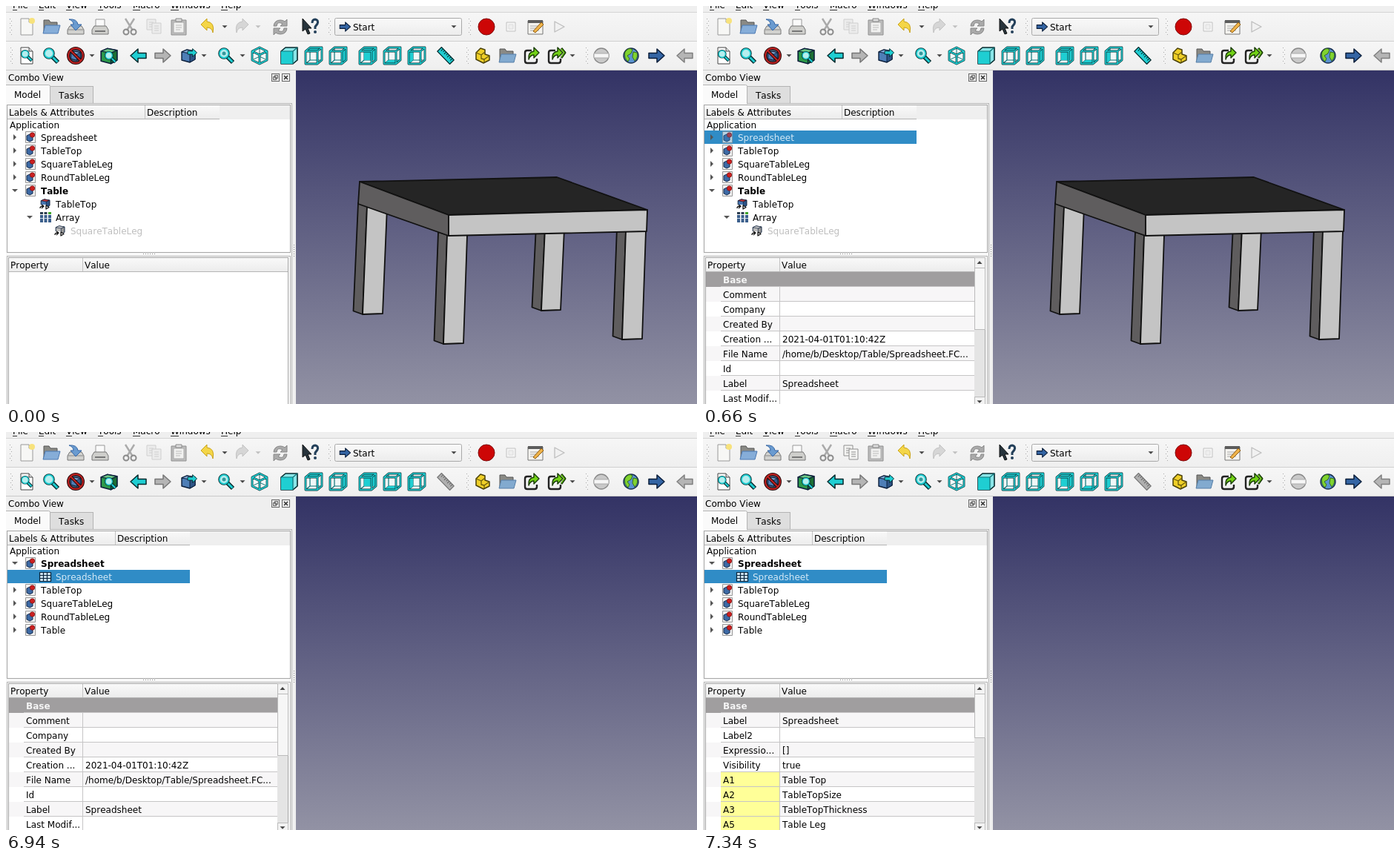
Animation of 932x537 px, one loop 8 s. Source, as an HTML page:

```html
<!DOCTYPE html>
<html lang="en">
<head>
<meta charset="utf-8">
<title>Table model</title>
<style>
html, body { margin: 0; width: 100%; height: 100%; overflow: hidden; background: #efefef; }
svg { display: block; width: 932px; height: 537px; font: 12px "DejaVu Sans", sans-serif; font-kerning: none; }
text { white-space: pre; }
</style>
</head>
<body>
<svg id="stage" viewBox="0 0 932 537"></svg>
<script>
const LOOP = 8000;
const STEPS = [500, 660, 4260, 4680, 6940, 7060, 7340];
const SELECT = 1, PROPS = 2, EXPAND = 3, NO_RULER = 4, CHILD = 5, CHILD_PROPS = 6, CAN_COPY = 7;
const CYAN = '#1fced2', DARK = '#06292c', BLUE = '#3465a4', NAVY = '#0b1e3a', SEL = '#308cc6';

const rect = (x, y, w, h, fill, stroke) =>
  `<rect x="${x}" y="${y}" width="${w}" height="${h}" fill="${fill}"${stroke ? ` stroke="${stroke}"` : ''}/>`;
const path = (d, fill = 'none', stroke = 'none', w = 1) =>
  `<path d="${d}" fill="${fill}" stroke="${stroke}" stroke-width="${w}" stroke-linejoin="round"/>`;
const circle = (x, y, r, fill, stroke = 'none', w = 1) =>
  `<circle cx="${x}" cy="${y}" r="${r}" fill="${fill}" stroke="${stroke}" stroke-width="${w}"/>`;
const text = (x, y, s, fill = '#000', bold) =>
  `<text x="${x}" y="${y}" fill="${fill}"${bold ? ' font-weight="bold"' : ''}>${s.replace('&', '&amp;')}</text>`;
const at = (x, y, body, scale = 1) => `<g transform="translate(${x} ${y}) scale(${scale})">${body}</g>`;
const frame = (x, y, w, h, fill, stroke) => rect(x + .5, y + .5, w - 1, h - 1, fill, stroke);
const down = (x, y, fill = '#444', r = 3.5) => path(`M${x - r} ${y - r / 2}h${2 * r}l${-r} ${r}z`, fill);
const right = (x, y) => path(`M${x - 2} ${y - 4}l4 4l-4 4z`, '#555');

const arrow = (fill, stroke, dir = 1) =>
  path(`M${11 * dir} 0L${1 * dir} -9V-3.5H${-10 * dir}V3.5H${1 * dir}V9Z`, fill, stroke, 1.5);
const lens = () => path('M1 1L9 9', 'none', DARK, 6) + path('M1 1L8.5 8.5', 'none', CYAN, 3) +
  circle(-3, -3, 6, '#8ee6e8', DARK, 3.6) + circle(-3, -3, 6, '#b6eeee', CYAN, 1.8);
const box = (fill, side, top) => path('M-9 -5L-2 -8L9 -6V5L2 9L-9 6Z', fill, NAVY, 1.4) +
  path('M2 -3L9 -6V5L2 9Z', side, NAVY, 1) + path('M-9 -5L-2 -8L9 -6L2 -3Z', top, NAVY, 1);
const folder = (c, light) => path('M-10 8V-9H-3L-1 -6H8V8Z', '#8a8a85', '#555', 1) +
  path('M-11 9L-8 -2H12L9 9Z', c, light, 1);

// Cube with one highlighted face; only the front view is solid
const FACES = {
  top: 'M-11 -6L-5 -11H11L5 -6Z', right: 'M5 -6L11 -11V6L5 11Z',
  rear: 'M-5 -11H11V6H-5Z', bottom: 'M-11 11L-5 6H11L5 11Z', left: 'M-11 -6L-5 -11V6L-11 11Z'
};
function cube(face) {
  const hull = 'M-11 -6L-5 -11H11V6L5 11H-11Z', edges = 'M-11 -6H5V11M5 -6L11 -11';
  if (face === 'front')
    return path(hull, '#8be6e8', DARK, 1.6) + path('M-11 -6H5V11H-11Z', CYAN) + path(edges, 'none', '#0d7478', 1.2);
  const wires = hull + edges, hidden = 'M-5 -11V6H11M-5 6L-11 11';
  return path(hull, '#f0f8f8') + path(hidden, 'none', '#0d7478', 1.2) + path(FACES[face], CYAN) +
    path(wires, 'none', DARK, 2.8) + path(wires, 'none', CYAN, 1.5);
}
function isoCube() {
  const d = 'M0 -11L10 -6V6L0 11L-10 6V-6ZM-10 -6L0 -1L10 -6M0 -1V11';
  return path(d, '#f0f8f8') + path('M-10 6L0 1L10 6M0 1V-11', 'none', '#0d7478') +
    path(d, 'none', DARK, 2.8) + path(d, 'none', CYAN, 1.5);
}
function ruler(on) {
  return '<g transform="rotate(46)">' + path('M-12 -4H12V4H-12Z', on ? CYAN : '#b0b0b0', on ? DARK : '#777', 1.3) +
    path('M-9 -4v4m3 -4v3m3 -3v4m3 -4v3m3 -3v4m3 -4v3m3 -3v4', 'none', on ? DARK : '#666') + '</g>';
}
function link(extra) {
  return path('M0 -7H-6Q-9 -7 -9 -4V7Q-9 10 -6 10H4Q7 10 7 7V4', 'none', '#222', 2.4) +
    path('M-4 5Q-5 -5 3 -6V-11L10 -4L3 3V-1Q-2 -1 -4 5Z', '#73d216', '#173a05', 1.4) +
    (extra ? path('M8 -10L13 -4L8 3', 'none', '#173a05', 3) + path('M8 -9L12 -4L8 2', 'none', '#73d216', 1.3) : '');
}
function page(c, line) {
  return path('M-8 -11H3L8 -6V11H-8Z', c, line) + path('M3 -11V-6H8', '#ddd', line);
}
function grip(x, y) {
  let dots = '';
  for (let i = 0; i < 8; i++) dots += rect(x + (i % 2) * 2, y + i * 3, 1, 1, '#a8a8a8');
  return dots;
}
const globe = () => circle(0, 0, 10, '#5b93d0', '#172d4d', 1.4) +
  path('M-8 -5Q-3 -12 2 -8L0 -3L-5 0L-2 4L-4 8Q-10 3 -8 -5ZM3 -5L8 -4Q10 2 5 7L2 2Z', '#80d330', '#2a5c0c', .8);

function fileBar(stage) {
  const copyLine = stage >= CAN_COPY ? '#909090' : '#cfcfcf';
  const copyFill = stage >= CAN_COPY ? '#f4f4f2' : '#ececec';
  const sheet = (x, y) => path(`M${x} ${y}h12v14h-12zm3 4h6m-6 3h6m-6 3h6`, copyFill, copyLine);
  const turn = dir => path(`M${-9 * dir} -3L${-1 * dir} -11V-7Q${10 * dir} -6 ${7 * dir} 8Q${6 * dir} 1 ${-1 * dir} 1V5Z`,
    dir > 0 ? '#f4d648' : '#d6d6d6', dir > 0 ? '#c9a21a' : '#c2c2c2');
  const icons = [
    [28, page('#f7f7f5', '#999') + circle(7, -8, 4, '#f7e27c')],
    [61, folder('#86add8', '#4a78b2')],
    [94, path('M-8 -1H8L11 4V10H-11V4Z', '#d2d2cf', '#777') + path('M-10 4H10', 'none', '#888') +
      path('M-9 -10Q2 -11 3 -3H8L0 5L-7 -3H-3Q-3 -8 -9 -10Z', '#6a9bd0', BLUE)],
    [127, path('M-6 -10H6V1H-6Z', '#fafafa', '#999') + path('M-8 -1H8L11 4V10H-11V4Z', '#cfcfcc', '#777') +
      path('M-7 6H7', 'none', '#777', 2)],
    [167, path('M-6 -11L4 5M6 -11L-4 5', 'none', '#aaa', 2.4) + circle(-5, 7, 3.5, 'none', '#8b8b8b', 2) +
      circle(5, 7, 3.5, 'none', '#8b8b8b', 2)],
    [200, sheet(-10, -10) + sheet(-3, -5)],
    [233, path('M-10 -9H10V11H-10Z', '#bcbcbc', '#909090') + path('M-7 -6H7V8H-7Z', '#f1f1f0', '#aaa') +
      path('M-4 -11H4V-7H-4Z', '#ddd', '#888') + path('M-4 -2H4M-4 1H4M-4 4H2', 'none', '#bbb')],
    [272, turn(1)], [318, turn(-1)],
    [370, path('M-9 -1Q-8 -9 0 -9Q4 -9 6 -7L9 -10V-1H0L3 -4Q-4 -8 -5 -1ZM9 2Q8 10 0 10Q-4 10 -6 8L-9 11V2H0L-3 5Q4 9 5 2Z',
      '#aaa', '#878787')],
    [410, path('M-10 -11V6L-6 3L-3 10L0 9L-3 2H2Z', '#27343c', '#111') +
      path('M3 -5Q3 -10 7 -10Q12 -9 10 -4L7 0V3', 'none', '#24405a', 3) + circle(7, 7, 2, '#24405a')],
    [648, circle(0, 0, 11, '#cd0606', '#7e0a0a', 1)],
    [681, path('M-6 -6H6V6H-6Z', '#f5f5f5', '#c2c2c2') + path('M-3 -3H3V3H-3Z', '#eee', '#ddd')],
    [714, path('M-10 -8H10V10H-10Z', '#f4f3ef', '#777') + rect(-10, -9, 20, 4, '#5c5c5c') +
      path('M-7 -1H5M-7 2H3M-7 5H5', 'none', '#aaa') + path('M-3 6L8 -6L11 -3L0 8Z', '#efb34a', '#8e5b10')],
    [746, path('M-6 -7L7 0L-6 7Z', '#f1f1f1', '#bebebe', 1.3)]
  ];
  return icons.map(([x, body]) => at(x, 28, body)).join('') +
    down(295, 28) + down(340, 28, '#c0c0c0') + grip(5, 17) + grip(435, 17) + grip(624, 17) +
    '<rect x="443.5" y="16.5" width="171" height="23" rx="2" fill="url(#button)" stroke="#a9a9a9"/>' +
    at(457, 28, arrow(BLUE, NAVY), .68) + text(468, 33, 'Start') + down(604, 28);
}

function viewBar(stage) {
  const icons = [
    [28, page('#fff', '#444') + at(0, 0, lens(), .75)],
    [61, lens()],
    [94, circle(0, 0, 10, '#3f5570') + at(0, 0, box('#4f7eb6', '#355f96', '#85addb'), .7) +
      path('M-7 -7L7 7', 'none', '#2b0c0c', 4) + circle(0, 0, 10, 'none', '#2b0c0c', 4) +
      path('M-7 -7L7 7', 'none', '#c32222', 1.8) + circle(0, 0, 10, 'none', '#c32222', 1.8)],
    [139, at(0, 0, box('#2c9a4a', '#1d6f35', '#6cc884'), 1.2) + at(2, 2, lens(), .75)],
    [179, arrow(CYAN, DARK, -1)], [211, arrow('#b5b5b5', '#777')],
    [246, box('#4e7eb7', '#2e5486', '#83acda') + at(5, -4, arrow(CYAN, DARK), .6)],
    [297, lens() + circle(-3, -3, 2.5, '#35989b')],
    [342, isoCube()], [382, cube('front')], [415, cube('top')], [448, cube('right')],
    [488, cube('rear')], [521, cube('bottom')], [554, cube('left')],
    [593, ruler(stage < NO_RULER)],
    [643, path('M-9 -4L-3 -10L3 -8V-2L9 0V6L1 10L-9 5Z', '#efcf28', '#49400a', 1.5) +
      path('M-9 -4L-2 -1L3 -5M-2 -1V4L2 5L9 0M2 5V9', 'none', '#6a5c0d', 1.3)],
    [676, folder('#82aacf', '#567fa8')], [709, link()], [741, link(true)],
    [803, circle(0, 0, 10, '#c9c9c9', '#888', 1.3) + path('M-10 -3H10V3H-10Z', '#f6f6f6', '#aaa')],
    [843, globe()], [877, arrow(BLUE, NAVY)], [916, arrow('#b5b5b5', '#808080', -1)]
  ];
  return icons.map(([x, body]) => at(x, 67, body)).join('') +
    [116, 267, 319, 764].map(x => down(x, 67)).join('') + [6, 621, 782].map(x => grip(x, 56)).join('');
}

function menu() {
  const items = [[9, 'File', 6], [44, 'Edit', 7], [81, 'View', 8], [124, 'Tools', 7], [171, 'Macro', 10], [222, 'Windows', 11], [290, 'Help', 9]];
  return items.map(([x, s, w]) => text(x, 3, s) + rect(x, 5, w, 1, '#333')).join('');
}

const docIcon = () => path('M-6.5 -7.5H6.5V7.5H-6.5Z', '#f2f2f2', '#979797') +
  path('M-5 -2L-1 -4L3 -2V4L-1 6L-5 4Z', '#3d6aa5', '#142b4d') + circle(2.5, -3, 3.2, '#cc2020', '#7c0d0d', .7);
const linkIcon = grey => at(0, -1, box(grey ? '#bcbcbc' : '#4777b3', grey ? '#999' : '#2d5487', grey ? '#ccc' : '#c43434'), .65) +
  path('M-8 1H1V7H-8Z', '#fff') + path('M-7 6Q-7 3 -3 3M-5 1L-2 3L-5 6M1 2L5 4.5L1 7Z', '#fff', '#111', 1.3);
const arrayIcon = () => [-7, -1.5, 4].map((x, i) =>
  rect(x, -3, 4, 10, '#3b5f8c') + rect(x, -7, 4, 3, i < 2 ? '#2c3e50' : '#3fa52c') + rect(x, 1, 4, 1, '#cbd8e8')).join('');
const gridIcon = on => path('M-7.5 -5.5h15v12h-15zm0 4h15m-15 4h15m-10 -8v12m5 -12v12', on ? '#cde3f2' : '#fff', on ? '#08243a' : '#111', 1.2);

function tree(stage) {
  const open = stage >= EXPAND;
  const width = open ? 248 : 288, split = open ? 147 : 187;
  // Columns: label, depth, marker, icon, style
  const rows = open
    ? [['Spreadsheet', 0, 'down', docIcon(), 'bold'], ['Spreadsheet', 1, '', gridIcon(stage >= CHILD)],
       ['TableTop', 0, 'right', docIcon()], ['SquareTableLeg', 0, 'right', docIcon()],
       ['RoundTableLeg', 0, 'right', docIcon()], ['Table', 0, 'right', docIcon()]]
    : [['Spreadsheet', 0, 'right', docIcon()], ['TableTop', 0, 'right', docIcon()],
       ['SquareTableLeg', 0, 'right', docIcon()], ['RoundTableLeg', 0, 'right', docIcon()],
       ['Table', 0, 'down', docIcon(), 'bold'], ['TableTop', 1, '', linkIcon()],
       ['Array', 1, 'down', arrayIcon()], ['SquareTableLeg', 2, '', linkIcon(true), 'dim']];
  const picked = stage < SELECT ? -1 : stage < CHILD ? 0 : 1;
  let out = frame(1, 133, 383, 200, '#fff', '#a6a6a6') + rect(2, 134, 381, 19, '#efefef') +
    rect(2, 134, width - 2, 18, 'url(#button)') + rect(2, 152, width - 2, 1, '#b5b5b5') + rect(split, 134, 1, 18, '#c3c3c3') +
    text(4, 148, 'Labels & Attributes') + text(split + 3, 148, 'Description') + text(5, 165, 'Application');
  rows.forEach(([label, depth, mark, icon, style], i) => {
    const y = 177 + i * 18, x = depth * 20, on = i === picked;
    if (on) out += rect(2, y - 9, width - 2, 18, SEL);
    if (mark === 'right') out += right(12 + x, y);
    if (mark === 'down') out += down(12 + x, y, on ? '#123e5c' : '#555', 4);
    out += at(33 + x, y, icon);
    if (on && depth === 0) out += `<g opacity=".3">${rect(26, y - 8, 14, 16, SEL)}</g>`;
    out += text(47 + x, y + 5, label, on ? (style ? '#fff' : '#d5e9f6') : style === 'dim' ? '#bebebe' : '#000', style === 'bold');
  });
  return out;
}

const DOC_PROPS = [['Comment', ''], ['Company', ''], ['Created By', ''], ['Creation ...', '2021-04-01T01:10:42Z'],
  ['File Name', '/home/b/Desktop/Table/Spreadsheet.FC...'], ['Id', ''], ['Label', 'Spreadsheet'], ['Last Modif...', '']];
const SHEET_PROPS = [['Label', 'Spreadsheet'], ['Label2', ''], ['Expressio...', '[]'], ['Visibility', 'true'],
  ['A1', 'Table Top'], ['A2', 'TableTopSize'], ['A3', 'TableTopThickness'], ['A5', 'Table Leg']];

function properties(stage) {
  const filled = stage >= PROPS, sheet = stage >= CHILD_PROPS;
  const edge = filled ? 366 : 380, line = '#c6c5c6';
  let out = frame(1, 337, 383, 210, '#f8f8f8', '#b4b4b4') + frame(3, 339, 378, 210, '#fff', '#a6a6a6') +
    rect(4, 340, edge - 4, 18, 'url(#button)') +
    rect(4, 358, edge - 4, 1, '#b5b5b5') + rect(103, 340, 1, 18, '#c3c3c3') +
    text(6, 354, 'Property') + text(106, 354, 'Value');
  if (!filled) return out;
  out += rect(4, 359, 362, 20, '#a09e9f') + rect(24, 378, 342, 1, line) + text(27, 374, 'Base', '#f4f4f4', true);
  (sheet ? SHEET_PROPS : DOC_PROPS).forEach(([name, value], i) => {
    const y = 379 + i * 20;
    out += rect(4, y, 362, 20, i % 2 ? '#fff' : '#f7f6f7');
    if (sheet && i > 3) out += rect(24, y, 79, 20, '#ffff98');
    out += rect(24, y + 19, 342, 1, line) + rect(103, y, 1, 20, line) +
      text(27, y + 15, name) + text(107, y + 15, value);
  });
  const thumb = sheet ? 60 : 84;
  return out + rect(366, 340, 14, 197, '#e4e4e4') + frame(366, 339, 15, 15, '#f3f3f3', '#bbb') +
    path('M369.5 348h7l-3.5 -4z', '#444') + frame(366, 353, 15, thumb, '#f6f6f6', '#bbb') +
    frame(366, 527, 15, 15, '#f3f3f3', '#bbb') + down(373, 534);
}

function panel() {
  let out = text(3, 101, 'Combo View') + frame(358, 91, 11, 11, 'none', '#666') +
    path('M362.5 93.5h4v4h-4zm-2 2h4v4h-4z', 'none', '#555') +
    frame(372, 91, 11, 11, 'none', '#666') + path('M375 94l5 5m0 -5l-5 5', 'none', '#333', 1.6) +
    frame(-1, 131, 387, 420, '#f8f8f8', '#b4b4b4') +
    frame(58, 108, 60, 24, '#dedede', '#b4b4b4') + path('M-1 106.5H57.5Q59.5 106.5 59.5 108.5V132H-1Z', '#fafafa', '#b4b4b4') +
    rect(0, 131, 59, 2, '#fafafa') + text(11, 124, 'Model') + text(71, 125, 'Tasks');
  for (let i = 0; i < 6; i++) out += rect(185 + i * 3, 334, 1, 1, '#888') + rect(388, 322 + i * 3, 1, 1, '#888');
  return out;
}

function table() {
  const poly = (points, fill) => path(`M${points}Z`, fill, '#111', 1.8);
  const side = '#5f5d5e', front = '#c4c4c4';
  const leg = (x, y, x2, y2, h = 0) =>
    poly(`${x - 12} ${y - 4}L${x} ${y}L${x2} ${y2}L${x2 - 12.5} ${y2 - 4.5}`, side) +
    poly(`${x} ${y}L${x + 27 - h} ${y}L${x2 + 27 - h} ${y2 - 1}L${x2} ${y2}`, front);
  return leg(727, 300, 722, 411, 1) + leg(487, 270, 481, 416) + leg(595, 309, 590, 456) + leg(836, 303, 831, 450) +
    poly('477 237L743 231L865 275L597 282', '#252525') +
    poly('477 237L597 282L597 310L475 267', side) + poly('597 282L865 275L864 304L597 310', front);
}

const DEFS = `<defs>
  <linearGradient id="sky" x2="0" y2="1"><stop stop-color="#333365"/><stop offset="1" stop-color="#9292a4"/></linearGradient>
  <linearGradient id="button" x2="0" y2="1"><stop stop-color="#f9f9f9"/><stop offset="1" stop-color="#ececec"/></linearGradient>
  <linearGradient id="bar" x2="0" y2="1"><stop stop-color="#f6f6f6"/><stop offset="1" stop-color="#efefef"/></linearGradient>
</defs>`;

const draw = stage => DEFS + rect(0, 0, 932, 537, '#efefef') + menu() +
  rect(0, 8, 932, 1, '#d4d4d4') + rect(0, 9, 932, 38, 'url(#bar)') + rect(0, 47, 932, 1, '#d0d0d0') +
  rect(0, 48, 932, 38, 'url(#bar)') + rect(0, 86, 932, 1, '#cacaca') +
  fileBar(stage) + viewBar(stage) + panel() + tree(stage) + properties(stage) +
  rect(391, 87, 541, 450, 'url(#sky)') + (stage < EXPAND ? table() : '');

const svg = document.getElementById('stage');
const start = performance.now();
let shown = -1;
function tick() {
  const time = (performance.now() - start) % LOOP;
  const stage = STEPS.filter(s => s <= time).length;
  if (stage !== shown) svg.innerHTML = draw(shown = stage);
  requestAnimationFrame(tick);
}
tick();
</script>
</body>
</html>
```
